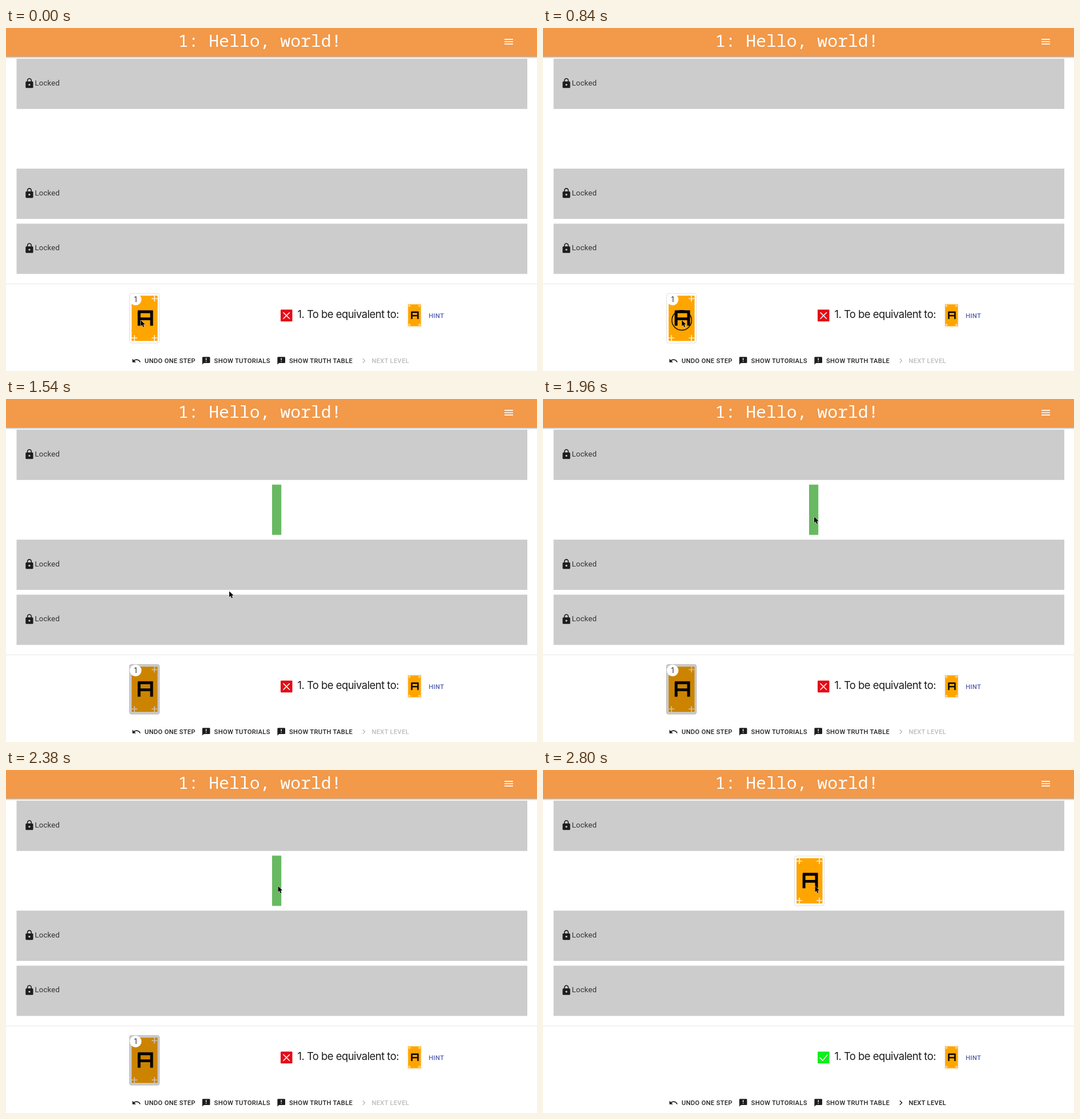
An HTML page for the animation above (2.94 s loop, 930 by 602 pixels).

```html
<!DOCTYPE html>
<html lang="en">
<head>
<meta charset="utf-8">
<title>Hello, world!</title>
<style>
  html, body { margin: 0; width: 100%; height: 100%; overflow: hidden; background: #fff; }
  svg { display: block; width: 930px; height: 602px; }
  text { white-space: pre; }
  .title { font: 29.8px "Noto Sans Mono", monospace; fill: #fff; }
  .label { font: 13.33px Roboto, sans-serif; letter-spacing: .1px; fill: #333; }
  .goal { font: 18.5px Inter, sans-serif; letter-spacing: -.55px; fill: #1c1c1c; }
  .button { font: 500 11.2px Roboto, sans-serif; letter-spacing: .32px; fill: #212121; }
  .badge { font: 13px Inter, sans-serif; fill: #333; text-anchor: middle; }
  .icon { fill: #1d1d1d; }
  .hint { fill: #5560ae; }
  .off { fill: #bcbcbc; }
  .bar { filter: drop-shadow(0 1px 1.5px rgba(0, 0, 0, .45)); }
</style>
</head>
<body>
<svg viewBox="0 0 930 602" xmlns="http://www.w3.org/2000/svg">
  <defs>
    <g id="card">
      <rect x=".5" y=".5" width="52" height="87" rx="3.5" fill="#fff" stroke="#dedede"/>
      <rect x="4" y="4.2" width="45.5" height="79.5" rx="1" fill="#ffa500"/>
      <path d="M4 9.5h10M9 4.5v10M39 9.5h10M44 4.5v10M4 78.5h10M9 73.5v10M39 78.5h10M44 73.5v10"
        stroke="#fff" stroke-opacity=".85" stroke-width="1.7"/>
      <path d="M15 30h26.5v27h-5V47.3H19.6V57h-5V33zM19.6 35v7.6h16.9V35z" fill="#000" fill-rule="evenodd"/>
    </g>
    <g id="lock" class="icon">
      <path d="M18 8h-1V6c0-2.760-2.240-5-5-5S7 3.240 7 6v2H6c-1.100 0-2 .9-2 2v10c0 1.100.9 2 2 2h12c1.100 0 2-.9 2-2V10c0-1.100-.9-2-2-2zm-6 9c-1.100 0-2-.9-2-2s.9-2 2-2 2 .9 2 2-.9 2-2 2zm3.100-9H8.900V6c0-1.710 1.390-3.100 3.100-3.100s3.100 1.390 3.100 3.100z"/>
    </g>
    <path id="note" class="icon" d="M20 2H4C2.900 2 2 2.900 2 4v18l4-4h14c1.100 0 2-.9 2-2V4c0-1.100-.9-2-2-2zm-7 9h-2V5h2zm0 4h-2v-2h2z"/>
    <g id="row">
      <rect x="18.500" width="894.500" height="88.200" fill="#ccc"/>
      <use href="#lock" transform="translate(31 33.200) scale(.83)"/>
      <text class="label" x="50.500" y="46.800">Locked</text>
    </g>
  </defs>

  <use href="#row" y="53.900"/>
  <use href="#row" y="246.800"/>
  <use href="#row" y="343.400"/>

  <g class="bar"><rect x="-10" y="-10" width="950" height="60" fill="#f2994a"/></g>
  <text class="title" x="301.500" y="32.500">1: Hello, world!</text>
  <path d="M873 19.900h15M873 24h15M873 28.200h15" stroke="#fff" stroke-width="1.700"/>

  <rect id="slot" x="466" y="150.300" width="16.200" height="88.200" fill="#68b961"/>
  <use id="placed" href="#card" x="440" y="150.500"/>

  <path d="M0 449h930" stroke="#e4e4e4"/>

  <g id="hand" transform="translate(216 465.500)">
    <use href="#card"/>
    <rect id="shade" width="53" height="88" rx="4" fill="#000" opacity=".2"/>
    <circle cx="11" cy="11" r="10.300" fill="#fff"/>
    <text class="badge" x="10.800" y="15.300">1</text>
  </g>

  <g id="cross">
    <rect x="481" y="494.300" width="20.500" height="20.700" rx="1" fill="#e30b17"/>
    <path d="M486 499.500l10.500 10.500M496.500 499.500l-10.500 10.500" stroke="#fff" stroke-width="1.600" stroke-linecap="round"/>
  </g>
  <g id="check">
    <rect x="481" y="494.300" width="20.500" height="20.700" rx="1" fill="#0cf01c"/>
    <path d="M484.500 504.500l5.300 5.500 8.700-10.500" fill="none" stroke="#fff" stroke-width="1.500"/>
  </g>
  <text class="goal" x="510.500" y="508.800">1. To be equivalent to:</text>
  <use href="#card" transform="translate(702.200 483) scale(.495 .485)"/>
  <text class="button hint" x="740.300" y="508.700">HINT</text>

  <path class="icon" transform="translate(220 575.600) scale(.7)"
    d="M12.500 8c-2.650 0-5.050.99-6.900 2.600L2 7v9h9l-3.620-3.620c1.390-1.160 3.160-1.880 5.120-1.880 3.540 0 6.550 2.310 7.600 5.500l2.370-.78C21.080 11.030 17.150 8 12.500 8z"/>
  <text class="button" x="242.800" y="588.200">UNDO ONE STEP</text>
  <use href="#note" transform="translate(342.400 575.800) scale(.68)"/>
  <text class="button" x="364.600" y="588.200">SHOW TUTORIALS</text>
  <use href="#note" transform="translate(474 575.800) scale(.68)"/>
  <text class="button" x="496" y="588.200">SHOW TRUTH TABLE</text>
  <g id="next">
    <path transform="translate(618.400 575.600) scale(.7)" d="M10 6L8.590 7.410 13.170 12l-4.580 4.590L10 18l6-6z"/>
    <text class="button" style="fill:inherit" x="640.400" y="588.200">NEXT LEVEL</text>
  </g>

  <g id="pointer">
    <circle id="ring" r="17.300" fill="none" stroke="#000" stroke-width="1.300"/>
    <path d="M0 0v10.200l2.400-2.100 1.700 4 1.900-.8-1.700-3.900 3.300-.2z" fill="#000" stroke="#fff" stroke-width=".9" paint-order="stroke"/>
  </g>
</svg>
<script>
const LOOP = 2940, STEP = 140;
const PICK = 980, PLACE = 2800;

// Pointer path: time, x, y
const path = [
  [0, 236, 513], [140, 236, 513], [280, 240, 513], [420, 243, 513],
  [1260, 243, 513], [1400, 302, 443], [1540, 391, 337.5], [1680, 445, 256.5],
  [1820, 467, 221], [1960, 475, 207], [2100, 476.5, 204], [LOOP, 476.5, 204]
];
const part = id => document.getElementById(id);
const show = (id, on) => { part(id).style.display = on ? "" : "none"; };

function pointAt(t) {
  const i = path.findIndex(p => p[0] > t);
  const [t0, x0, y0] = path[i - 1], [t1, x1, y1] = path[i];
  const k = (t - t0) / (t1 - t0);
  return [x0 + (x1 - x0) * k, y0 + (y1 - y0) * k];
}

function draw(time) {
  // The screen refreshes in whole steps
  const t = Math.floor((time % LOOP) / STEP) * STEP;
  const picked = t >= PICK, placed = t >= PLACE;
  show("slot", picked && !placed);
  show("shade", picked);
  show("hand", !placed);
  show("placed", placed);
  show("cross", !placed);
  show("check", placed);
  show("ring", t === PICK - STEP || t === PLACE - STEP);
  part("next").setAttribute("class", placed ? "icon" : "off");
  part("pointer").setAttribute("transform", `translate(${pointAt(t)})`);
}

const start = performance.now();
function tick() {
  draw(performance.now() - start);
  requestAnimationFrame(tick);
}
tick();
</script>
</body>
</html>
```
